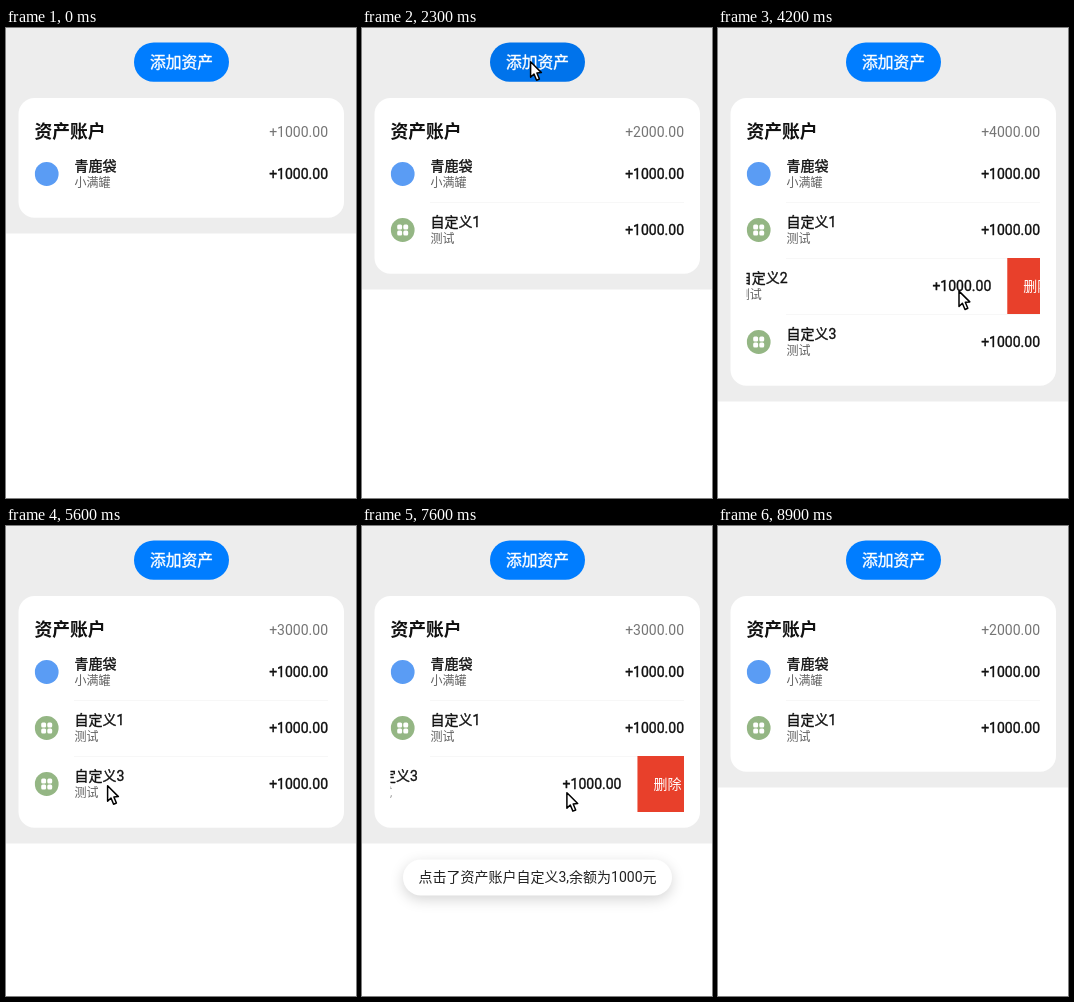
An HTML page with a canvas that plays this animation: 350x470 px, repeating every 9400 ms.

```html
<!DOCTYPE html>
<html lang="zh-CN">
<head>
<meta charset="utf-8">
<title>资产账户</title>
<style>
  html, body { margin: 0; width: 100%; height: 100%; overflow: hidden; background: #fff; }
  canvas { display: block; width: 350px; height: 470px; }
</style>
</head>
<body>
<canvas id="stage"></canvas>
<script>
const W = 350, H = 470, LOOP = 9400, STEP = 100;
const LEFT = 29, RIGHT = 322, ROW = 56, ROW_TOP = 118;
const OPEN = 76, PULL = 650;
const FONT = "Roboto, 'Noto Sans CJK SC', 'Noto Sans CJK', 'Noto Sans', sans-serif";

const canvas = document.getElementById('stage');
const ctx = canvas.getContext('2d');
const dpr = window.devicePixelRatio || 1;
canvas.width = W * dpr;
canvas.height = H * dpr;

// "swipe" is the time the row starts to slide open
const accounts = [
  { name: '青鹿袋', note: '小满罐', from: 0, to: LOOP, plain: true },
  { name: '自定义1', note: '测试', from: 1800, to: LOOP },
  { name: '自定义2', note: '测试', from: 2400, to: 5000, swipe: 3912 },
  { name: '自定义3', note: '测试', from: 3100, to: 8400, swipe: 7200 }
];

// Pointer moves: begin, end, x, y
const moves = [
  [0, 200, 265, 309],
  [200, 1000, 168, 33],     // to the button
  [3100, 3900, 289, 261],
  [3900, 4400, 214, 263],   // drag
  [4400, 4800, 291, 261],
  [5000, 5600, 101, 259],
  [6300, 7100, 293, 257],
  [7200, 7700, 194, 267],   // drag
  [7700, 8100, 291, 262],
  [8400, 8800, 264, 400]
];

const clamp = u => Math.min(1, Math.max(0, u));
const ease = u => u * u * (3 - 2 * u);

function pointerAt(t) {
  let x = 0, y = 0;
  for (const [begin, end, toX, toY] of moves) {
    const k = ease(clamp((t - begin) / (end - begin)));
    x += (toX - x) * k;
    y += (toY - y) * k;
  }
  return [x, y];
}

function slide(account, t) {
  if (!account.swipe) return 0;
  return OPEN * Math.sin(clamp((t - account.swipe) / PULL) * Math.PI / 2);
}

// The button darkens under the pointer and more while it is held down
function buttonColor(t) {
  const hover = t >= 1000 && t < 3400 ? 0.025 : 0;
  const held = (t >= 1500 && t < 1800) || (t >= 2300 && t < 2400) || (t >= 3000 && t < 3100);
  const fading = accounts.some(a => a.from && t >= a.from && t < a.from + STEP);
  const k = 1 - hover - (held ? 0.055 : fading ? 0.03 : 0);
  return `rgb(0, ${125 * k}, ${255 * k})`;
}

function pill(x, y, w, h, r, fill) {
  ctx.beginPath();
  ctx.roundRect(x, y, w, h, r);
  ctx.fillStyle = fill;
  ctx.fill();
}

// "edge" thickens the regular weight a little
function text(str, x, y, size, fill, { align = 'left', weight = 400, edge = 0 } = {}) {
  ctx.font = `${weight} ${size}px ${FONT}`;
  ctx.textAlign = align;
  ctx.fillStyle = ctx.strokeStyle = fill;
  ctx.fillText(str, x, y);
  if (!edge) return;
  ctx.lineWidth = edge;
  ctx.lineJoin = 'round';
  ctx.strokeText(str, x, y);
}

function icon(account, x, y) {
  pill(x - 11.9, y - 11.9, 23.8, 23.8, 11.9, account.plain ? '#5a9cf4' : '#94b684');
  if (account.plain) return;
  for (const dx of [-5.5, 0.6])
    for (const dy of [-5.5, 0.6]) pill(x + dx, y + dy, 4.9, 4.9, 1.5, '#fff');
}

function drawRow(account, top, shift) {
  const mid = top + ROW / 2;
  ctx.save();
  ctx.beginPath();
  ctx.rect(LEFT - 0.5, top, RIGHT - LEFT + 0.5, ROW);
  ctx.clip();
  icon(account, 40.7 - shift, mid);
  text(account.name, 68.5 - shift, mid - 2.8, 14, '#111', { edge: 0.35 });
  text(account.note, 68.5 - shift, mid + 13.3, 12, '#606060');
  text('+1000.00', RIGHT - shift, mid + 5, 14, '#111', { align: 'right', edge: 0.35 });
  ctx.fillStyle = '#e8402b';
  ctx.fillRect(RIGHT + 16 - shift, top, 60, ROW);
  text('删除', RIGHT + 32 - shift, mid + 5.2, 14, '#fff');
  ctx.restore();
}

function drawToast(t) {
  const shown = Math.min((t - 5900) / 200, (8100 - t) / 200);
  if (shown <= 0) return;
  ctx.save();
  ctx.globalAlpha = clamp(shown);
  ctx.shadowColor = 'rgba(0,0,0,0.17)';
  ctx.shadowBlur = 14 * dpr;
  ctx.shadowOffsetY = 4 * dpr;
  pill(41, 333.5, 269, 36, 18, '#fff');
  ctx.shadowColor = 'transparent';
  text('点击了资产账户自定义3,余额为1000元', 175.5, 356.3, 14, '#222', { align: 'center' });
  ctx.restore();
}

function drawPointer(t) {
  if (t < 200 || t >= 8900) return;
  const shape = new Path2D('M.6 .8V16.2L4 13L6.6 19.2L9.4 18L6.9 12L11.4 11.6Z');
  ctx.save();
  ctx.translate(...pointerAt(t));
  ctx.fillStyle = '#fff';
  ctx.fill(shape);
  ctx.strokeStyle = '#000';
  ctx.lineWidth = 1.5;
  ctx.lineJoin = 'round';
  ctx.stroke(shape);
  ctx.restore();
}

function draw(t) {
  const rows = accounts.filter(a => t >= a.from && t < a.to);
  const grow = (rows.length - 1) * ROW;
  ctx.setTransform(dpr, 0, 0, dpr, 0, 0);
  ctx.fillStyle = '#fff';
  ctx.fillRect(0, 0, W, H);
  ctx.fillStyle = '#ededed';
  ctx.fillRect(0, 0, W, 205.5 + grow);

  pill(128, 14.4, 95, 39.4, 19.7, buttonColor(t));
  text('添加资产', 175.5, 39.8, 15.8, '#fff', { align: 'center', edge: 0.35 });

  pill(12.5, 70, 325.5, 119.8 + grow, 16, '#fff');
  text('资产账户', LEFT - 0.5, 110.1, 17.8, '#111', { weight: 700 });
  text(`+${rows.length * 1000}.00`, RIGHT, 109, 14, '#757575', { align: 'right' });

  rows.forEach((account, i) => {
    const top = ROW_TOP + i * ROW;
    if (i) {
      ctx.fillStyle = '#f7f7f7';
      ctx.fillRect(68, top, RIGHT - 68, 1);
    }
    drawRow(account, top, slide(account, t));
  });

  drawToast(t);
  drawPointer(t);
}

const start = performance.now();
function tick() {
  const t = (performance.now() - start) % LOOP;
  draw(Math.floor(t / STEP) * STEP);
  requestAnimationFrame(tick);
}
tick();
</script>
</body>
</html>
```
